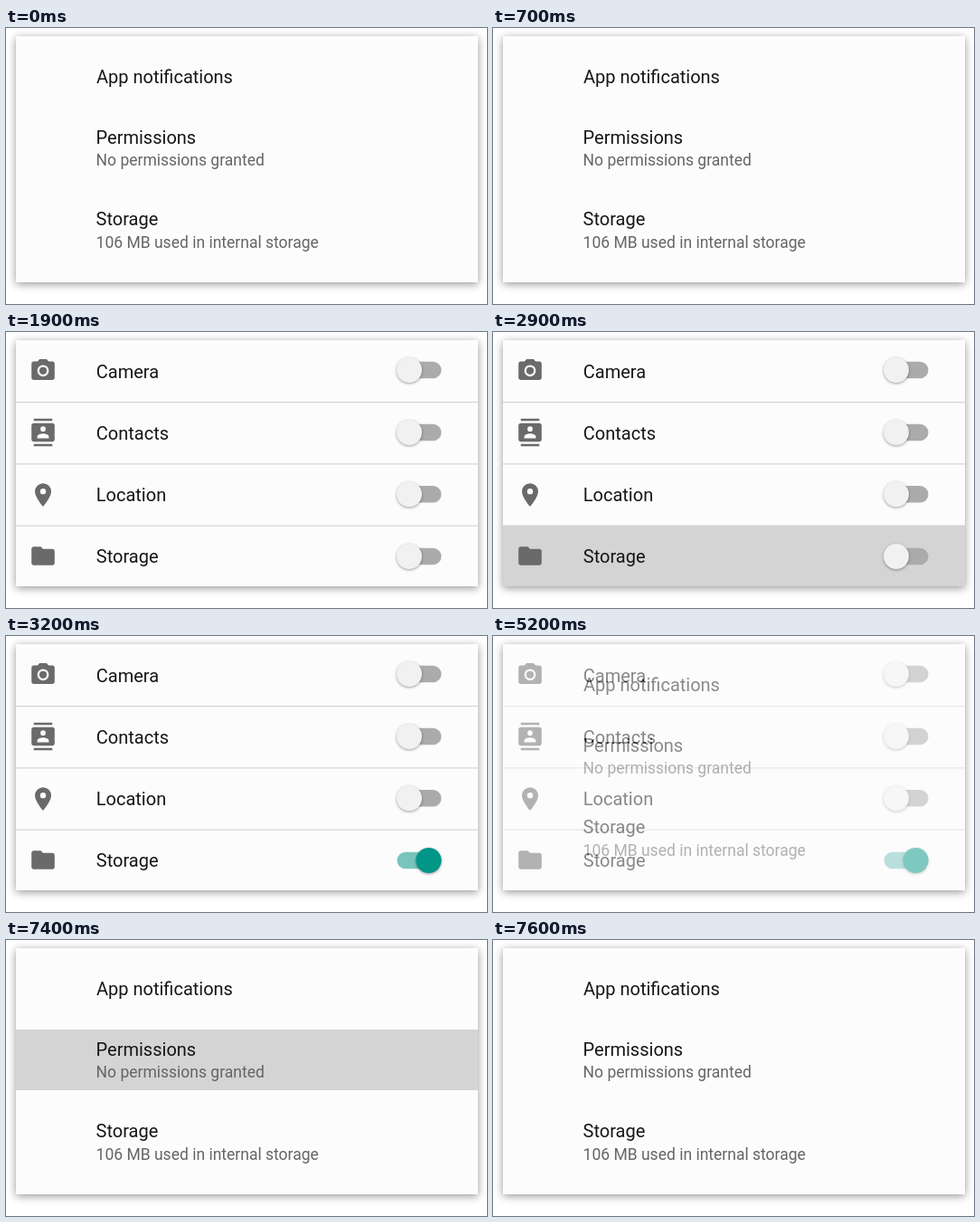
Write an HTML page that moves like this. It is 532 px wide and 305 px high and loops after 8000 ms.

```html
<!DOCTYPE html>
<html lang="en">
<head>
<meta charset="utf-8">
<title>App permissions</title>
<style>
  html, body { margin: 0; width: 100%; height: 100%; overflow: hidden; background: #fff; }
  #card { position: absolute; left: 11px; top: 9px; width: 511px; height: 272px;
          background: #fcfcfc; box-shadow: 0 2px 9px rgba(0, 0, 0, .42); }
  svg { position: absolute; left: 0; top: 0; }
  text { font: 20px Roboto, sans-serif; fill: #161616; }
  .sub { font-size: 17.5px; fill: #656565; }
  .press { fill: #d4d4d4; }
  .icon { fill: #6a6a6a; fill-rule: evenodd; }
  .thumb { filter: drop-shadow(0 1.5px 1.5px rgba(0, 0, 0, .38)); }
</style>
</head>
<body>
<div id="card"></div>
<svg width="532" height="305" viewBox="0 0 532 305">
  <g id="info">
    <rect id="pressInfo" class="press" x="11" y="99" width="511" height="67"/>
    <text x="100" y="61.3">App notifications</text>
    <text x="99.6" y="128.2">Permissions</text>
    <text class="sub" x="99.6" y="152.3">No permissions granted</text>
    <text x="99.6" y="218.4">Storage</text>
    <text class="sub" x="99.6" y="242.6">106 MB used in internal storage</text>
  </g>
  <g id="list">
    <rect x="11" y="9" width="511" height="272" fill="#fcfcfc"/>
    <rect id="pressList" class="press" x="11" y="214" width="511" height="67"/>
  </g>
</svg>
<script>
const $ = id => document.getElementById(id);
const LOOP = 8000;

// label, baseline, icon centre, switch centre, icon path on a 24-unit grid
const rows = [
  ['Camera', 51, 42.8, 42, 'M9 2 7.17 4H4c-1.1 0-2 .9-2 2v12c0 1.1.9 2 2 2h16c1.1 0 2-.9 2-2V6c0-1.1-.9-2-2-2h-3.17L15 2zM12 17a5 5 0 1 1 0-10 5 5 0 0 1 0 10zM12 15.2a3.2 3.2 0 1 0 0-6.4 3.2 3.2 0 0 0 0 6.4z'],
  ['Contacts', 119.2, 111, 111, 'M20 0H4v2h16zM4 24h16v-2H4zM20 4H4c-1.1 0-2 .9-2 2v12c0 1.1.9 2 2 2h16c1.1 0 2-.9 2-2V6c0-1.1-.9-2-2-2zM12 6.75a2.25 2.25 0 1 1 0 4.5 2.25 2.25 0 0 1 0-4.5zM17 17H7v-1.5c0-1.67 3.33-2.5 5-2.5s5 .83 5 2.5z'],
  ['Location', 187.2, 180, 179.3, 'M12 2a7 7 0 0 0-7 7c0 5.25 7 13 7 13s7-7.75 7-13a7 7 0 0 0-7-7zM12 11.5a2.5 2.5 0 1 1 0-5 2.5 2.5 0 0 1 0 5z'],
  ['Storage', 255.2, 247.5, 248, 'M10 4H4c-1.1 0-2 .9-2 2v12c0 1.1.9 2 2 2h16c1.1 0 2-.9 2-2V8c0-1.1-.9-2-2-2h-8z']
];

$('list').insertAdjacentHTML('beforeend', rows.map(([label, base, iconY, y, path], i) => `
  ${i ? `<rect x="11" y="${9 + 68.2 * i}" width="511" height="1" fill="#cdcdcd"/>` : ''}
  <path class="icon" transform="translate(41 ${iconY}) scale(1.28) translate(-12 -12)" d="${path}"/>
  <text x="99.8" y="${base}">${label}</text>
  <rect class="track" x="432.5" y="${y - 9.3}" width="49" height="18.6" rx="9.3"/>
  <circle class="thumb" cy="${y}" r="14"/>`).join(''));

const tracks = document.querySelectorAll('.track');
const thumbs = document.querySelectorAll('.thumb');

function setSwitch(i, on) {
  tracks[i].setAttribute('fill', on ? '#7ac4bc' : '#ababab');
  thumbs[i].setAttribute('fill', on ? '#009688' : '#f1f1f1');
  thumbs[i].setAttribute('cx', on ? 467.5 : 446);
}
rows.forEach((_, i) => setSwitch(i, false));

function draw(now) {
  const t = now % LOOP;
  const during = (a, b) => t >= a && t < b;
  const blending = during(1700, 1900) || during(5200, 5400);
  $('list').style.opacity = blending ? .5 : +during(1900, 5200);
  $('pressInfo').style.opacity = +(during(500, 700) || during(7400, 7600));
  $('pressList').style.opacity = +during(2900, 3200);
  setSwitch(3, t >= 3200);
}

const start = performance.now();
function tick() {
  draw(performance.now() - start);
  requestAnimationFrame(tick);
}
tick();
</script>
</body>
</html>
```
